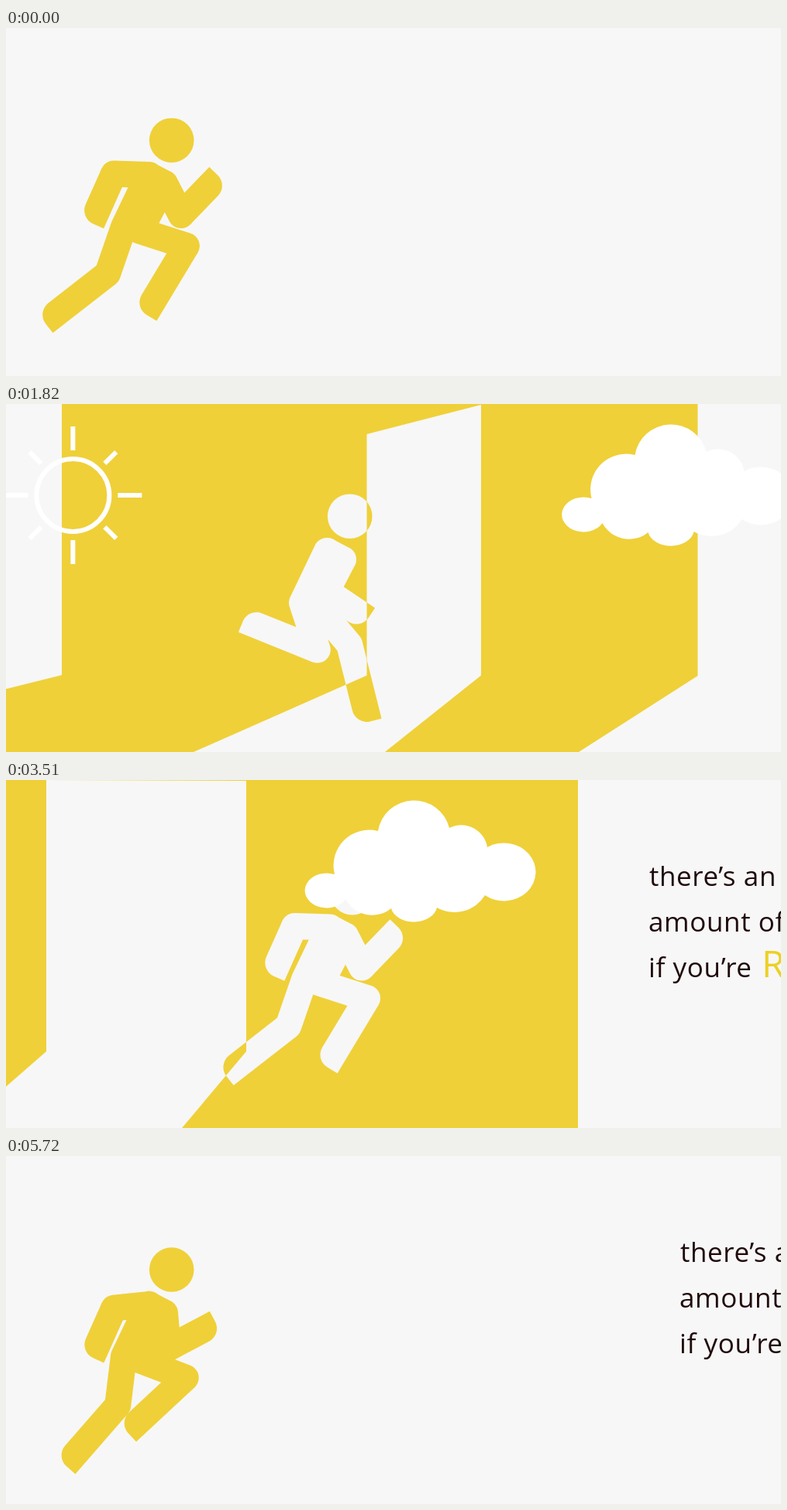
An HTML page for the animation above (5.85 s loop, 1000 px wide and 450 px high).

```html
<!DOCTYPE html>
<html lang="en">
<head>
<meta charset="utf-8">
<title>Runner</title>
<style>
  html, body { margin: 0; width: 100%; height: 100%; overflow: hidden; background: #f7f7f7; }
  svg { display: block; width: 100vw; height: 100vh; }
  .yellow { color: #efd038; }
  .white { color: #f7f7f7; }
  #man { fill: currentColor; }
  #bones { stroke: currentColor; stroke-width: 34; stroke-linejoin: round; stroke-linecap: round; }
  text { font: 35px "Open Sans", "Noto Sans", sans-serif; letter-spacing: .6px; fill: #200b0c; }
  .big { font-size: 48px; letter-spacing: -.5px; fill: #edd025; }
</style>
</head>
<body>
<svg viewBox="0 0 1000 450" preserveAspectRatio="none">
  <defs>
    <clipPath id="lit"><path id="litShape" clip-rule="evenodd"/></clipPath>
    <g id="man">
      <circle cx="213.7" cy="145.2" r="28.8"/>
      <path id="bones"/>
      <path id="tips"/>
    </g>
  </defs>
  <path id="wall" fill="#efd038" fill-rule="evenodd"/>
  <use id="dark" class="yellow" href="#man"/>
  <g clip-path="url(#lit)"><use id="light" class="white" href="#man"/></g>
  <g id="sun" fill="none" stroke="#fff" stroke-width="6">
    <circle r="47"/>
    <path id="rays"/>
  </g>
  <path id="cloud" fill="#fff" d="M783 66A47 47 0 0 1 875 62A34 34 0 0 1 924 87A41 37.5 0 1 1 921 149A46 46 0 0 1 859 165A30 22 0 0 1 800 166A39 39 0 0 1 741 154A28 22.5 0 1 1 727 122A46 46 0 0 1 783 66Z"/>
  <g id="words">
    <text x="0" y="137">there’s an<tspan class="big" x="175.5">UNLIMITED</tspan></text>
    <text x="-1" y="196">amount of<tspan class="big" x="186">CALLBORATION</tspan></text>
    <text x="-1" y="255">if you’re<tspan class="big" x="145">READY</tspan></text>
  </g>
</svg>
<script>
const STEP = 130, FRAMES = 45, STRIDE = 18, HALF = 17;
const $ = id => document.getElementById(id);
const clamp = (v, lo, hi) => Math.min(hi, Math.max(lo, v));

// Key poses of one stride; limb angles in degrees, 0 is down and 90 is forward
const KEYS = [0, 2, 3, 5, 6, 8, 9, 11, 12, 14, 15, 17];
const LEG = {
  root: [162, 259.5], swing: [10, 2.5], peak: 2.5, lengths: [64, 103],
  upper: [72, 69, 44, 40, 17, -7, -19, -19, -8, 18, 36, 69],
  lower: [-31, 9, 21, 14, -2, -41, -52, -81, -105, -112, -100, -47]
};
const ARM = {
  root: [195, 195.5], swing: [10, 5.5], peak: 1, lengths: [46, 70],
  upper: [27, 19, -3, -35, -20, -84, -92, -84, -75, -21, -7, 5],
  lower: [136, 159, 94, 56, 10, -24, -24, -19, -14, 0, 120, 118]
};
const TORSO = 'M184 190L205 201L179 251L152 257Z';

function angleAt(angles, u) {
  let i = KEYS.length - 1;
  while (KEYS[i] > u) i--;
  const j = (i + 1) % KEYS.length;
  const f = (u - KEYS[i]) / ((KEYS[j] || STRIDE) - KEYS[i]);
  return (angles[i] + (angles[j] - angles[i]) * f) * Math.PI / 180;
}

const reach = ([x, y], angle, len) => [x + Math.sin(angle) * len, y + Math.cos(angle) * len];

// Shoulder or hip swings forward for half a stride, back for the other
function limb(kind, phase) {
  const u = phase % STRIDE;
  const side = clamp(6 * Math.cos((u - kind.peak) / STRIDE * 2 * Math.PI), -1, 1);
  const root = kind.root.map((v, i) => v + kind.swing[i] * side);
  const joint = reach(root, angleAt(kind.upper, u), kind.lengths[0]);
  return { root, joint, angle: angleAt(kind.lower, u), len: kind.lengths[1] };
}

// Lower limb: square end with one rounded corner
function tip({ joint, angle, len }) {
  const r = HALF + 2;
  const at = (along, side) => reach(reach(joint, angle, along), angle - Math.PI / 2, side);
  return `M${at(0, -HALF)}L${at(len, -HALF)}L${at(len, HALF - r)}` +
    `A${r} ${r} 0 0 1 ${at(len - r, HALF)}L${at(0, HALF)}Z`;
}

function drawMan(n) {
  const limbs = [LEG, ARM].flatMap(kind => [limb(kind, n), limb(kind, n + STRIDE / 2)]);
  $('bones').setAttribute('d', TORSO + limbs.map(l => `M${l.root}L${l.joint}`).join(''));
  $('tips').setAttribute('d', limbs.map(tip).join(''));
}

const scroll = n => n < 25 ? 0 : 35 + 134 * (n - 25);

function wallPath(n, s) {
  if (n < 1 || s > 1041) return 'M0 0';
  if (n > 20) return `M0 0H${1041 - s}V450H0Z`;
  const l = 457 - 27.5 * n, r = 535.5 + 25.5 * n;
  return `M${l} 0H${r}V351.5L${417 + 23 * n} 450H${430 - 54 * n}L${l} 350.5Z`;
}

function doorPath(n, s) {
  if (n < 7 || s > 613) return '';
  const k = Math.min(n, 20) - 6;
  const l = 613 - 18.43 * k - s, r = 613 - s;
  return `M${l} ${91 - 6.5 * k}L${r} 1V351L${434 + 6.86 * k - s} 450` +
    `H${Math.max(242, 434 - 48 * k) - s}L${l} 351Z`;
}

// Remaining share of an entrance that slows down over ten steps
const rest = (n, from, power) => Math.pow(1 - clamp((n - from) / 10, 0, 1), power);

const manX = n => n <= 25 ? Math.min(16.43 * n, 324) : Math.max(0, 324 - 45.4 * (n - 25));

function wordsX(n, s) {
  const exit = Math.max(0, (n - 40) / 4);
  return Math.max(399, 1133 - s) + 471 * exit * exit + (n < 25 ? 1000 : 0);
}

function move(id, x, y) {
  $(id).setAttribute('transform', `translate(${x.toFixed(2)} ${y.toFixed(2)})`);
}

function draw(n) {
  const s = scroll(n), shape = wallPath(n, s) + doorPath(n, s);
  $('wall').setAttribute('d', shape);
  $('litShape').setAttribute('d', shape);
  drawMan(n);
  const drop = clamp((n - 25) / 4, 0, 1.8);
  move('dark', manX(n), drop);
  move('light', manX(n), drop);
  move('sun', 155 - 250 * rest(n, 10, 2.53) - s, 118);
  move('cloud', 315 * rest(n, 10, 4.7) - s, 0);
  move('words', wordsX(n, s), 0);
}

let rays = '';
for (let i = 0; i < 8; i++) {
  const a = i * Math.PI / 4;
  rays += `M${reach([0, 0], a, 58)}L${reach([0, 0], a, i % 2 ? 79 : 89)}`;
}
$('rays').setAttribute('d', rays);

const start = performance.now();
let last = -1;
function tick() {
  const n = Math.floor((performance.now() - start) / STEP) % FRAMES;
  if (n !== last) draw(last = n);
  requestAnimationFrame(tick);
}
tick();
</script>
</body>
</html>
```
